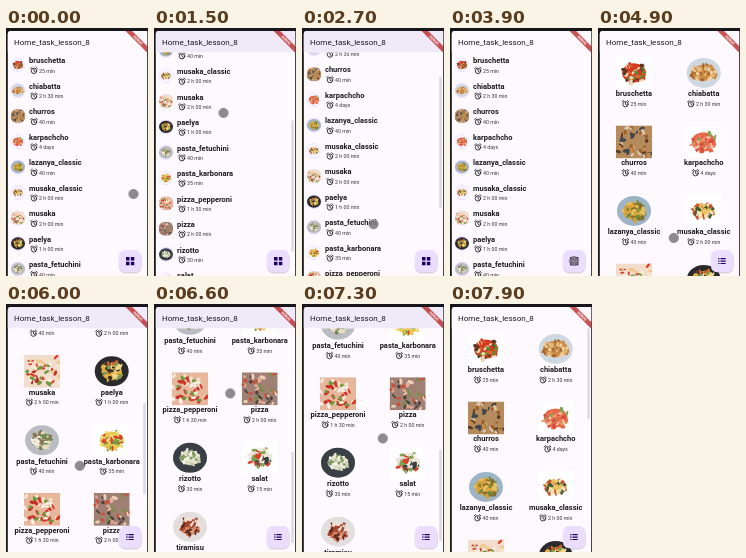
Write an HTML page that moves like this. It is 142 by 248 pixels and loops after 8 s.

```html
<!DOCTYPE html>
<html lang="en">
<head>
<meta charset="utf-8">
<title>Recipe list</title>
<style>
@property --s { syntax: '<number>'; inherits: true; initial-value: 0; }
html, body { margin: 0; width: 100%; height: 100%; overflow: hidden; background: #17161a; }
svg { display: block; width: 142px; height: 248px; font-family: Roboto, sans-serif; }
.name { font-size: 7.5px; font-weight: 700; fill: #1d1b20; }
.time { font-size: 5.25px; fill: #34313a; }
.clock { fill: none; stroke: #1d1b20; stroke-width: .85; stroke-linecap: round; }
#stage { animation: scroll 8s linear infinite; }
.items { transform: translateY(calc(var(--s) * -1px)); }
.thumb { fill: #000; fill-opacity: .12; transform: translateY(calc(var(--s) * var(--k) * 1px)); }
.bars { animation: bars 8s linear infinite; }
.rows { animation: rows 8s step-end infinite; }
.cells { opacity: 0; animation: cells 8s step-end infinite; }
#tint { fill: #f0e9f8; animation: tint 8s linear infinite; }
#dot { fill: #7f7a83; fill-opacity: .88; stroke: #67636c; stroke-opacity: .6; animation: dot 8s linear infinite; }

@keyframes scroll {
  0%, 12.5% { --s: 0 }
  13.75% { --s: 12 }
  15% { --s: 38 }
  17.5% { --s: 94 }
  18.75% { --s: 116.5 }
  20% { --s: 133 }
  22.5% { --s: 154 }
  23.75%, 26% { --s: 158.5 }
  27.5% { --s: 148 }
  33.75% { --s: 42 }
  37.2%, 61.25% { --s: 0 }
  62.5% { --s: 10 }
  67.5% { --s: 100 }
  70% { --s: 136 }
  73.2% { --s: 160 }
  75% { --s: 184.4 }
  77.5% { --s: 230 }
  81.25% { --s: 290 }
  84% { --s: 323 }
  85.5%, 88.75% { --s: 329 }
  91.25% { --s: 301 }
  93.75% { --s: 165 }
  95% { --s: 94 }
  96.25% { --s: 36 }
  97.5% { --s: 6 }
  98.5%, 100% { --s: 0 }
}
@keyframes bars {
  0%, 12.5% { opacity: 0 }
  14%, 43% { opacity: 1 }
  47%, 61.5% { opacity: 0 }
  63%, 100% { opacity: 1 }
}
@keyframes tint {
  0%, 12.5% { opacity: 0 }
  15%, 36% { opacity: 1 }
  37.5%, 61.5% { opacity: 0 }
  64%, 97% { opacity: 1 }
  98.7%, 100% { opacity: 0 }
}
@keyframes rows { 0% { opacity: 1 } 51.25%, 100% { opacity: 0 } }
@keyframes cells { 0% { opacity: 0 } 51.25%, 100% { opacity: 1 } }
@keyframes dot {
  0%, 1% { transform: translate(127.5px, 166px) }
  6.25%, 8.6% { transform: translate(78px, 216px) }
  10%, 12.5% { transform: translate(74px, 201px) }
  13.75% { transform: translate(73px, 189px) }
  15% { transform: translate(72px, 163px) }
  17.5% { transform: translate(71px, 107px) }
  18.75% { transform: translate(69.5px, 85px) }
  20%, 26% { transform: translate(69.5px, 78px) }
  27.5% { transform: translate(70px, 90px) }
  33.75% { transform: translate(71.5px, 196px) }
  37.2%, 39% { transform: translate(72px, 234px) }
  46.5%, 53.5% { transform: translate(124px, 233px) }
  60%, 61.25% { transform: translate(75.8px, 210px) }
  62.5% { transform: translate(75.5px, 200px) }
  67.5% { transform: translate(74.5px, 110px) }
  69.5% { transform: translate(74px, 95px) }
  73.2% { transform: translate(74px, 187px) }
  75% { transform: translate(73.8px, 162px) }
  77.5% { transform: translate(74px, 117px) }
  80.5% { transform: translate(75px, 84px) }
  88.75% { transform: translate(80px, 106px) }
  91.25% { transform: translate(80.8px, 134px) }
  93.75% { transform: translate(81px, 215px) }
  95%, 100% { transform: translate(82px, 260px) }
}
</style>
</head>
<body>
<svg viewBox="0 0 142 248">
  <defs>
    <clipPath id="screen"><path d="M1.8 248V6q0-3 3-3H141.2V248Z"/></clipPath>
    <clipPath id="round"><circle r="7.4"/></clipPath>
    <clipPath id="photo"><rect x="-18" y="-16.5" width="36" height="33"/></clipPath>
    <g id="clock" class="clock">
      <circle r="2.7" cy=".3"/>
      <path d="M0-1.2V.5L1.2 1.2M-3.4-2.1-1.9-3.4M3.4-2.1 1.9-3.4"/>
    </g>
  </defs>
  <g id="stage" clip-path="url(#screen)">
    <rect width="142" height="248" fill="#fdf9ff"/>
    <g class="rows">
      <g class="items" id="list"></g>
      <g class="bars"><rect class="thumb" style="--k:.585" x="137.2" y="24.3" width="2.6" height="131"/></g>
    </g>
    <g class="cells">
      <g class="items" id="grid"></g>
      <g class="bars"><rect class="thumb" style="--k:.405" x="137.2" y="24.3" width="2.6" height="91"/></g>
    </g>

    <rect width="142" height="24.3" fill="#fdf9ff"/>
    <rect id="tint" width="142" height="24.3"/>
    <text x="8" y="16.6" font-size="8.05" fill="#1d1b20">Home_task_lesson_8</text>

    <rect x="113" y="223.2" width="22.5" height="22.5" rx="6.5" fill="#000" opacity=".1"/>
    <rect x="112.5" y="223" width="23.5" height="22" rx="6.5" fill="#000" opacity=".08"/>
    <rect x="113" y="222" width="22.3" height="22.3" rx="6" fill="#eaddff"/>
    <path class="rows" fill="#21005d" d="M120 229h3.5v3.5h-3.5ZM124.8 229h3.5v3.5h-3.5ZM120 233.8h3.5v3.5h-3.5ZM124.8 233.8h3.5v3.5h-3.5Z"/>
    <path class="cells" stroke="#21005d" stroke-width="1.2" d="M120.2 230.7h1.3m1 0h5.2M120.2 233.1h1.3m1 0h5.2M120.2 235.5h1.3m1 0h5.2"/>

    <g transform="translate(141.2 3) rotate(45)">
      <rect x="-20" y="10.6" width="40" height="4.7" fill="#b71c1c" opacity=".75"/>
      <text y="14.2" font-size="3.6" font-weight="700" fill="#fff" text-anchor="middle">DEBUG</text>
    </g>
    <circle id="dot" r="4.6"/>
  </g>
</svg>
<script>
// name, time, backdrop shape, backdrop colour, food colours, food half width and height
const dishes = [
  ['bruschetta', '25 min', 'none', '#fff', '#d23a22 #e0632f #4f8f32 #f0d8b0 #4a3a2a', 14, 12],
  ['chiabatta', '2 h 30 min', 'plate', '#cfd8e0', '#c98a45 #e3b878 #a8672f #efd0a0', 15, 10],
  ['churros', '40 min', 'rect', '#b58a5c', '#9c5f2c #c98a45 #5a3a22 #d8c8b0 #3f4850', 17, 15],
  ['karpachcho', '4 days', 'none', '#fff', '#e8694a #f0906a #d84a3a #7fa550 #f5c0a0', 14, 12],
  ['lazanya_classic', '40 min', 'plate', '#9db3c6', '#d9a23a #8a6a2a #e8c060 #6f8a3a', 13, 11],
  ['musaka_classic', '2 h 00 min', 'none', '#fff', '#e8c060 #3f5a30 #c9502f #f5e6c0', 13, 8],
  ['musaka', '2 h 00 min', 'rect', '#f2ddcd', '#d8432c #f0c890 #f7ede0 #6f9a40 #b8322a', 17, 15],
  ['paelya', '1 h 00 min', 'plate', '#2a2a2c', '#e3b040 #c9602a #f0d890 #2f2f2f #7f9a50', 12, 11],
  ['pasta_fetuchini', '40 min', 'plate', '#b9bdc2', '#e8dcc0 #f5efe0 #8a7a5a #6a8a50', 11, 10],
  ['pasta_karbonara', '35 min', 'none', '#fff', '#e8c850 #f2e08a #6f9a40 #d8402a', 14, 11],
  ['pizza_pepperoni', '1 h 30 min', 'rect', '#e7b79c', '#d8382a #f2e6d0 #c92f24 #f6efe4 #6f9a40', 17, 15],
  ['pizza', '2 h 00 min', 'rect', '#a08074', '#e0a890 #c9503a #f0d0b8 #7f8a50 #4a443e', 17, 15],
  ['rizotto', '30 min', 'plate', '#3a3f46', '#e8e4d0 #c9ccb0 #f6f4ea #7f9a60', 12, 9],
  ['salat', '15 min', 'none', '#fff', '#e9e2d6 #d8402a #f5f0e6 #7fa050 #3a403c', 13, 11],
  ['tiramisu', '6 h 00 min', 'plate', '#e2dedd', '#a8452f #d88a6a #5a2a1c #f2e0d4', 11, 10],
];
const ROW = 25.5, CELL_W = 69.7, CELL_H = 69;

const add = (parent, tag, attrs, text = '') => {
  const node = document.createElementNS('http://www.w3.org/2000/svg', tag);
  for (const key in attrs) node.setAttribute(key, attrs[key]);
  node.textContent = text;
  return parent.appendChild(node);
};
const seeded = seed => () => (seed = seed * 16807 % 2147483647) / 2147483647;

const defs = document.querySelector('defs');
const list = document.getElementById('list');
const grid = document.getElementById('grid');

function drawFood(id, shape, base, colors, w, h) {
  const random = seeded(id * 977 + 4321);
  const food = add(defs, 'g', { id: 'food' + id, 'clip-path': 'url(#photo)' });
  const palette = colors.split(' ');
  const square = shape === 'rect';
  if (shape === 'plate') add(food, 'ellipse', { rx: 17, ry: 15, fill: base });
  else add(food, 'rect', { x: -18, y: -16.5, width: 36, height: 33, fill: base, opacity: square ? 1 : .6 });
  if (!square) add(food, 'ellipse', { rx: w * .85, ry: h * .8, fill: palette[0] });
  for (let i = 0; i < 45; i++) {
    const turn = random() * 6.283, far = Math.sqrt(random()) * .88;
    const x = square ? random() * 2 - 1 : Math.cos(turn) * far;
    const y = square ? random() * 2 - 1 : Math.sin(turn) * far;
    add(food, 'ellipse', {
      rx: 1.5 + random() * 2, ry: .9 + random(), fill: palette[i % palette.length],
      transform: `translate(${x * w} ${y * h}) rotate(${random() * 180})`,
    });
  }
}

dishes.forEach(([name, time, ...look], i) => {
  drawFood(i, ...look);

  const row = add(list, 'g', { transform: `translate(0 ${i * ROW})` });
  const avatar = add(row, 'g', { transform: 'translate(12 37)' });
  add(avatar, 'circle', { r: 7.4, fill: '#eaddff' });
  const crop = add(avatar, 'g', { 'clip-path': 'url(#round)' });
  add(crop, 'use', { href: '#food' + i, transform: 'scale(.41)' });
  add(row, 'text', { class: 'name', x: 23, y: 35.2 }, name);
  add(row, 'use', { href: '#clock', x: 28, y: 42.6 });
  add(row, 'text', { class: 'time', x: 33, y: 44.6 }, time);

  const cell = add(grid, 'g', { transform: `translate(${36 + i % 2 * CELL_W} ${(i >> 1) * CELL_H})` });
  add(cell, 'use', { href: '#food' + i, y: 45 });
  add(cell, 'text', { class: 'name', y: 68.4, 'text-anchor': 'middle' }, name);
  const label = add(cell, 'text', { class: 'time', y: 78 }, time);
  const left = -(label.getComputedTextLength() + 9) / 2;
  label.setAttribute('x', left + 9);
  add(cell, 'use', { href: '#clock', x: left + 4, y: 76 });
});
</script>
</body>
</html>
```
